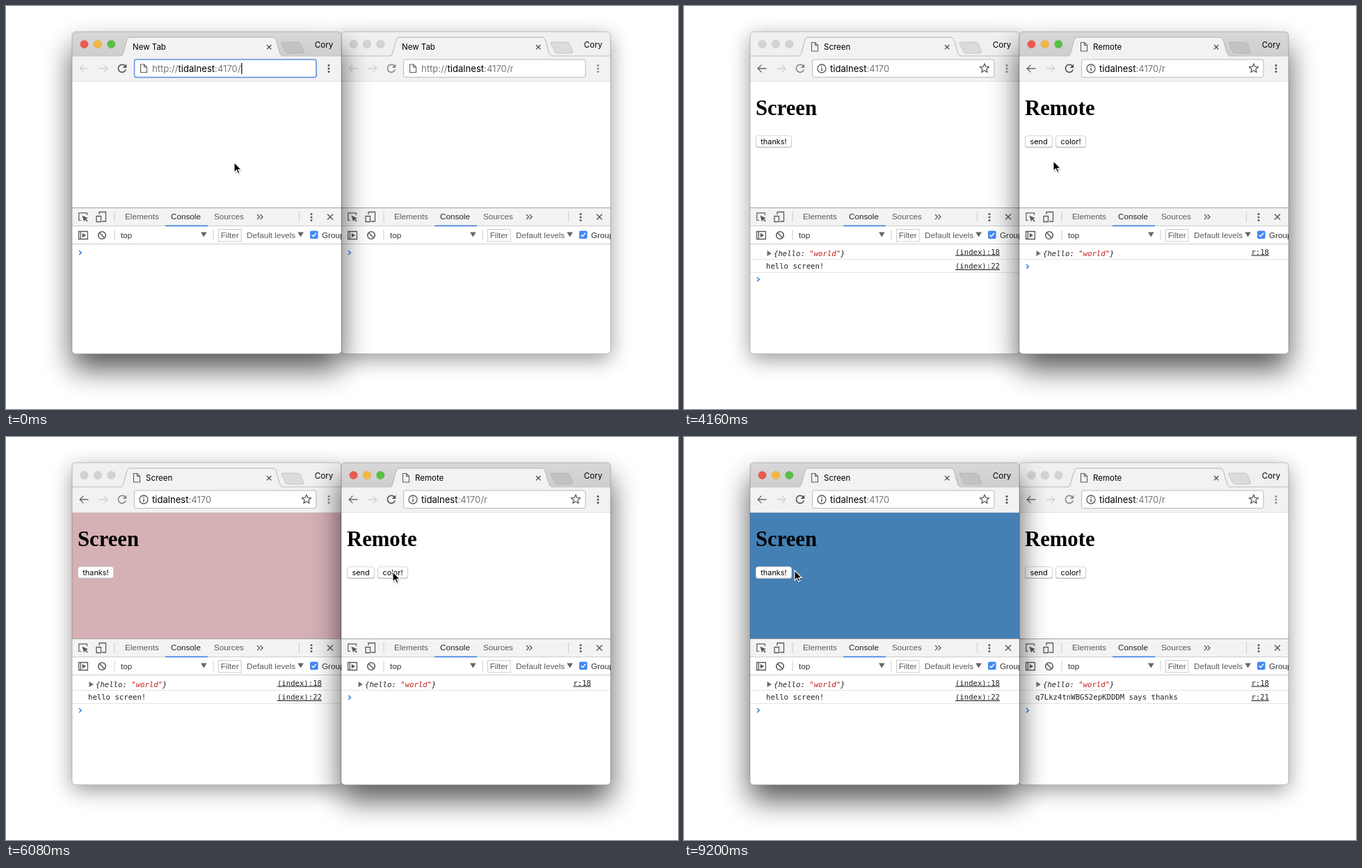
An HTML page for the animation above (9280 ms loop, 966 by 580 pixels).

```html
<!DOCTYPE html>
<html lang="en">
<head>
<meta charset="utf-8">
<title>Two windows</title>
<style>
  html, body { margin: 0; width: 100%; height: 100%; overflow: hidden; background: #fff; }
  svg { display: block; width: 100%; height: 100%; }
  text { white-space: pre; }
  .ui { font-family: Inter, Roboto, sans-serif; }
  .dev { font: 11.7px "Liberation Sans", Arial, sans-serif; fill: #5a5a5a; }
  .mono { font: 10.65px "DejaVu Sans Mono", "Liberation Mono", monospace; fill: #222; }
  .h1 { font: bold 30.7px "Liberation Serif", Times, serif; }
  .line { fill: none; stroke: #5a5a5a; stroke-width: 1.3; }
  .hide { display: none; }
</style>
</head>
<body>
<svg id="stage" viewBox="0 0 966 580" xmlns="http://www.w3.org/2000/svg">
  <defs>
    <filter id="deep" filterUnits="userSpaceOnUse" x="0" y="-60" width="580" height="720"><feGaussianBlur stdDeviation="21"/></filter>
    <filter id="soft" filterUnits="userSpaceOnUse" x="0" y="-60" width="580" height="720"><feGaussianBlur stdDeviation="15"/></filter>
    <filter id="tiny" x="-50%" y="-50%" width="200%" height="200%"><feGaussianBlur stdDeviation="1"/></filter>
    <linearGradient id="bar" x2="0" y2="1"><stop stop-color="#d8d8d8"/><stop offset="1" stop-color="#cecece"/></linearGradient>
    <clipPath id="frame"><rect x="95" y="37" width="387" height="463.5" rx="5"/></clipPath>
  </defs>
  <g id="windows"></g>
  <g id="cursor">
    <path d="M0 0V14.5L3.4 11.3L5.6 16.2L8 15.2L5.8 10.5H10.3Z" transform="translate(.5 1.5)" opacity=".4" filter="url(#tiny)"/>
    <path d="M0 0V14.5L3.4 11.3L5.6 16.2L8 15.2L5.8 10.5H10.3Z" stroke="#fff" stroke-width="1.1"/>
  </g>
</svg>
<script>
const LOOP = 9280, STEP = 80, SHIFT = 387;
const HOST = 'tidalnest', PORT = ':4170';
const $ = id => document.getElementById(id);

const text = (x, y, str, cls, extra = '') => `<text x="${x}" y="${y}" class="${cls}" ${extra}>${str}</text>`;
const rect = (x, y, w, h, fill, extra = '') => `<rect x="${x}" y="${y}" width="${w}" height="${h}" fill="${fill}" ${extra}/>`;
const path = (d, extra = '') => `<path d="${d}" class="line" ${extra}/>`;
const group = (cls, body) => `<g class="${cls}">${body}</g>`;
const dots = (x, y, fill) => [-4.6, 0, 4.6].map(d => `<circle cx="${x}" cy="${y + d}" r="1.5" fill="${fill}"/>`).join('');
const lights = colors => colors.map((c, i) =>
  `<circle cx="${112.5 + i * 19.4}" cy="55" r="5.8" fill="${c}" stroke="#000" stroke-opacity=".12" stroke-width=".6"/>`).join('');
const doc = (x, y, h) => path(`M${x} ${y}h5l4 4v${h - 4}h-9zM${x + 5} ${y}v4h4`, 'style="stroke-width:1.1"');
const chevron = y => path(`M105 ${y - 3}l3.3 3l-3.3 3`, 'style="stroke:#3b7ded;stroke-width:1.6"');
const rule = y => rect(95, y, 387, 1, '#e4e4e4');
const link = (y, str) => text(454, y, str, 'mono', 'text-anchor="end" text-decoration="underline"');

function star(cx, cy) {
  const pts = Array.from({ length: 10 }, (_, i) => {
    const a = i * Math.PI / 5 - Math.PI / 2, r = i % 2 ? 3 : 6.9;
    return (cx + r * Math.cos(a)).toFixed(1) + ' ' + (cy + r * Math.sin(a)).toFixed(1);
  });
  return path('M' + pts.join('L') + 'Z', 'stroke-linejoin="round"');
}

function button(x, w, label) {
  return rect(x, 187, w, 17, '#bbb', 'rx="3.5"') + rect(x + .5, 186.7, w - 1, 16.2, '#fff', 'rx="3.2" stroke="#c8c8c8" stroke-width=".7"') +
    text(x + w / 2, 199, label, 'ui', 'font-size="10.9" text-anchor="middle"');
}

function address(tail, secure) {
  const scheme = secure ? '' : '<tspan fill="#777">http://</tspan>';
  return text(210, 95, `${scheme}${HOST}<tspan fill="#777">${PORT}${tail}</tspan>`, 'ui url', 'font-size="13.1"');
}

function chrome(o) {
  const tab = 'M165 72C171 72 171 45 178 45H384C391 45 391 72 398 72';
  const slant = fill => `<path d="M398 52H419Q422 52 423.5 55L427.5 65Q428 68 425 68H406Q403 68 402 66L396 54Q395 52 398 52Z" fill="${fill}" stroke="#aaa" stroke-opacity=".7" stroke-width=".8"/>`;
  const reload = c => path('M171.3 86.2A5.6 5.6 0 1 0 172.3 91.6', `style="stroke:${c};stroke-width:1.6"`) +
    `<path d="M173.2 83.6V89H167.8Z" fill="${c}"/>`;
  const arrow = (x, d, c) => path(`M${x + 6 * d} 90H${x - 6 * d}m${5 * d} -5.4l${-5.4 * d} 5.4l${5.4 * d} 5.4`, `style="stroke:${c}"`);
  return group('on', rect(95, 37, 387, 35, 'url(#bar)')) + group('off', rect(95, 37, 387, 35, '#f0f0f0')) +
    group('lit', lights(['#ed594c', '#f5b63c', '#58c145'])) + group('dim', lights(['#d3d3d3', '#d3d3d3', '#d3d3d3'])) +
    rect(95, 71.5, 387, 37, '#f2f2f2') + rect(95, 71.5, 387, .9, '#b8b8b8') +
    `<path d="${tab}V73H165Z" fill="#f2f2f2"/><path d="${tab}" fill="none" stroke="#aaa" stroke-width=".9"/>` +
    group('on', slant('#c2c2c2')) + group('off', slant('#dcdcdc')) +
    path('M375 56l6.4 6.4m0-6.4l-6.4 6.4', 'style="stroke:#4a4a4a"') +
    text(457, 60, 'Cory', 'ui', 'font-size="11.6" text-anchor="middle"') +
    group('pre', text(182, 63, 'New Tab', 'ui', 'font-size="11.5"') + arrow(112.5, 1, '#d0d0d0')) +
    group('post', doc(183.5, 52.5, 12.5) + text(201, 63, o.title, 'ui', 'font-size="11.5"') + arrow(112.5, 1, '#666')) +
    arrow(139.5, -1, '#d0d0d0') +
    group('on', reload('#505050') + dots(464, 90, '#505050')) + group('off', reload('#858585') + dots(464, 90, '#8a8a8a')) +
    rect(184.5, 77, 261.5, 25.6, '#fff', 'rx="3" stroke="#b9b9b9"') +
    group('focus', rect(184.6, 77, 261.4, 25.6, 'none', 'rx="2.5" stroke="#6b9be6" stroke-width="1.7"') +
      '<rect class="caret" y="82" width="1.2" height="16"/>') +
    group('pre', doc(193.5, 84, 11.5) + address(o.typed, false)) +
    group('post', `<circle cx="198" cy="90" r="6" class="line"/>${rect(197.3, 89, 1.5, 4.5, '#555')}${rect(197.3, 86, 1.5, 1.6, '#555')}` +
      address(o.tail, true) + star(432, 89.8)) +
    rect(95, 108, 387, .8, '#ddd');
}

function tools() {
  const sep = (x, y) => rect(x, y, 1, 15, '#ccc');
  const drop = x => `<path d="M${x} 325.5h8.6l-4.3 7z" fill="#666"/>`;
  return rect(95, 290, 387, 211, '#fff') + rect(95, 290.5, 387, 26, '#f3f3f3') + rect(95, 290, 387, 1, '#a3a3a3') +
    rect(95, 316, 387, 1, '#ccc') + rect(229, 315.5, 61, 1.7, '#4583dc') +
    path('M108 308.5H104.8V297.8H116.5V301', 'style="stroke-width:1.2"') +
    '<path d="M109.3 301.5L118 305.2L114.9 306.4L117.8 309.4L116.4 310.6L113.6 307.6L112.2 310.6Z" fill="#5a5a5a"/>' +
    path('M134 300V296.5H143.5V310H138M130 302.5h6.5V310.5H130Z') +
    sep(155.5, 296) + text(171, 307, 'Elements', 'dev') + text(237, 307, 'Console', 'dev', 'style="fill:#222"') +
    text(299, 307, 'Sources', 'dev') + path('M361 300l3.5 3.5l-3.5 3.5m4.5-7l3.5 3.5l-3.5 3.5') +
    sep(421, 296) + dots(439, 304, '#5a5a5a') + path('M462 299.5l8 8m0-8l-8 8', 'style="stroke-width:1.5"') +
    path('M104.6 324.5H117.4V335.5H104.6ZM107.3 324.5V335.5') + '<path d="M109.7 326.7L115.2 330L109.7 333.3Z" fill="#5a5a5a"/>' +
    '<circle cx="138" cy="330" r="5.3" class="line" style="stroke-width:1.6"/>' + path('M134.3 326.3l7.4 7.4', 'style="stroke-width:1.6"') +
    sep(155.5, 322) + text(165, 333.5, 'top', 'dev', 'style="fill:#333"') + drop(280) + sep(297.5, 322) +
    rect(305.5, 321.5, 32.5, 17.5, '#fff', 'stroke="#ccc"') + text(308.7, 334, 'Filter', 'dev') +
    text(346, 333.5, 'Default levels', 'dev') + drop(419.3) +
    rect(437, 323.5, 11.6, 11.6, '#438af5', 'rx="2"') + path('M439.7 329.4l2.2 2.3l4-5', 'style="stroke:#fff;stroke-width:1.5"') +
    text(454, 333.5, 'Group', 'dev', 'style="fill:#333"') + rect(95, 342, 387, 1, '#ccc') +
    group('pre', chevron(355));
}

function logs(o) {
  return group('post', '<path d="M119.5 352L126 356L119.5 360Z" fill="#6e6e6e"/>' +
      text(129, 359.5, '{hello: <tspan fill="#c41a16">"world"</tspan>}', 'mono', 'font-style="italic" style="font-style:italic"') +
      link(357.5, o.file + ':18') + rule(364)) +
    group('one', chevron(375)) +
    group('two', text(118, 378, o.log, 'mono') + link(378, o.file + ':' + o.row) + rule(383) + chevron(393.5));
}

function makeWindow(x, o) {
  const el = document.createElementNS('http://www.w3.org/2000/svg', 'g');
  el.setAttribute('transform', `translate(${x} 0)`);
  el.innerHTML =
    group('on', rect(95, 59, 387, 463.5, '#000', 'rx="5" opacity=".66" filter="url(#deep)"')) +
    group('off', rect(95, 45, 387, 463.5, '#000', 'rx="5" opacity=".4" filter="url(#soft)"')) +
    `<g clip-path="url(#frame)">${rect(95, 37, 387, 464, '#fff')}${rect(95, 108.5, 387, 182, '#fff', 'class="page"')}` +
    chrome(o) + group('post', text(103, 157, o.title, 'h1') + o.buttons) + tools() + logs(o) +
    group('status', rect(94, 273, 130.5, 20, '#ececec', 'rx="3" stroke="#c4c4c4" stroke-width=".8"') +
      text(99.5, 285.5, `Waiting for ${HOST}...`, 'ui', 'font-size="10.7" fill="#777"') + rect(95, 290, 131, 1, '#a3a3a3')) +
    '</g>' + rect(95, 37, 387, 463.5, 'none', 'rx="5" stroke="#000" stroke-opacity=".27" stroke-width=".8"');
  $('windows').append(el);
  return el;
}

const left = makeWindow(0, {
  title: 'Screen', typed: '/', tail: '', file: '(index)', row: 22, log: 'hello screen!',
  buttons: button(103, 52, 'thanks!')
});
const right = makeWindow(SHIFT, {
  title: 'Remote', typed: '/r', tail: '/r', file: 'r', row: 21, log: 'q7Lkz4tnWBGS2epKDDDM says thanks',
  buttons: button(103, 40, 'send') + button(147, 44, 'color!')
});

// Each key: time, then values
const MOVES = [
  [0, 328, 225], [400, 328, 225], [960, 690, 92], [1360, 690, 92], [1920, 556, 206], [2000, 555, 210], [2480, 540, 214],
  [2880, 510, 195], [3920, 510, 195], [4160, 531, 223], [4560, 556, 194],
  [6960, 556, 194], [7120, 468, 209], [7600, 131, 194], [8880, 131, 194], [9200, 159, 192]
];
const COLORS = [
  [4560, 255, 255, 255], [4960, 164, 61, 71], [5200, 164, 61, 71], [5600, 213, 176, 181],
  [6080, 213, 176, 181], [6720, 68, 128, 180]
];
const FADE = [[1840, 1], [2240, 0]];

function sample(keys, t) {
  let i = keys.findIndex(k => k[0] > t);
  if (i < 0) return keys[keys.length - 1].slice(1);
  if (i === 0) return keys[0].slice(1);
  const a = keys[i - 1], b = keys[i];
  const p = (t - a[0]) / (b[0] - a[0]), e = p * p * (3 - 2 * p);
  return a.slice(1).map((v, j) => v + (b[j + 1] - v) * e);
}

function show(el, flags) {
  for (const name in flags)
    el.querySelectorAll('.' + name).forEach(n => n.classList.toggle('hide', !flags[name]));
}

function update(el, s) {
  show(el, {
    on: s.active, off: !s.active, lit: s.lit, dim: !s.lit, pre: !s.loaded, post: s.loaded,
    one: s.loaded && !s.logged, two: s.logged, focus: s.focus, status: s.status > 0
  });
  el.querySelector('.status').setAttribute('opacity', s.status);
  if (s.focus) {
    const end = 210.6 + el.querySelector('.pre .url').getComputedTextLength();
    el.querySelector('.caret').setAttribute('x', end);
  }
}

function draw(t) {
  const rightActive = t >= 960 && t < 7920, rightLit = t >= 1040 && t < 8080;
  update(left, { active: !rightActive, lit: !rightLit, loaded: t >= 320, logged: t >= 3120, focus: t < 320, status: 0 });
  update(right, {
    active: rightActive, lit: rightLit, loaded: t >= 1600, logged: t >= 8240, focus: t >= 1040 && t < 1600,
    status: t < 1520 ? 0 : sample(FADE, t)[0]
  });
  const top = rightActive ? right : left;
  if ($('windows').lastChild !== top) $('windows').append(top);
  left.querySelector('.page').setAttribute('fill', `rgb(${sample(COLORS, t).map(Math.round)})`);
  $('cursor').setAttribute('transform', `translate(${sample(MOVES, t)})`);
}

let last = -1;
const start = performance.now();
function tick() {
  const t = Math.floor((performance.now() - start) % LOOP / STEP) * STEP;
  if (t !== last) draw(last = t);
  requestAnimationFrame(tick);
}
tick();
</script>
</body>
</html>
```
